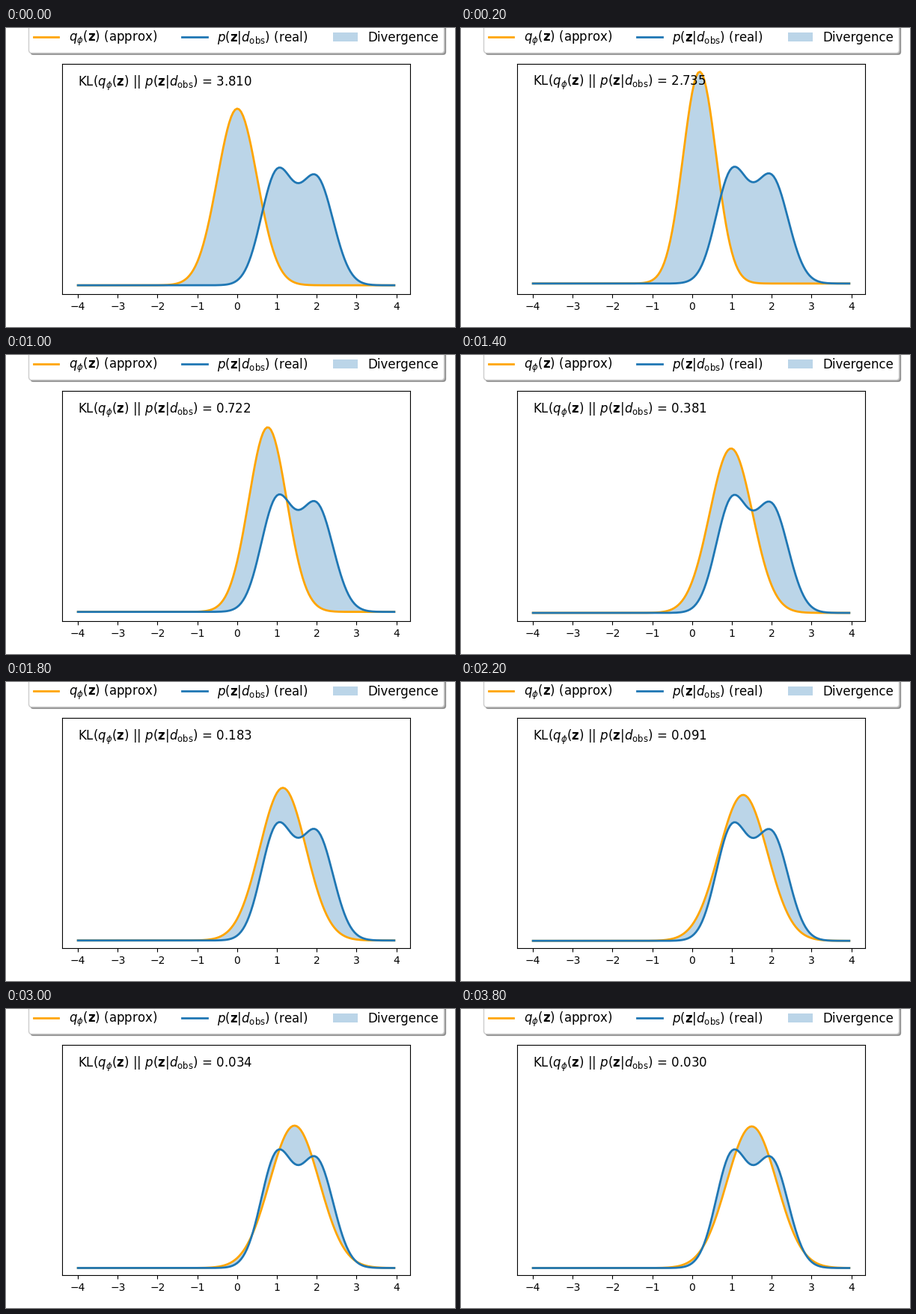
Recreate the animation shown at these times as a matplotlib script. Size 600x400 px, loop 4000 ms.

```python
import numpy as np
import matplotlib.pyplot as plt
from matplotlib.animation import FuncAnimation

FRAMES, INTERVAL = 20, 200

# Optimisation path: step, mean and width of q, divergence
STEPS = np.array([0, 1, 2, 3, 5, 7, 11, 15, 19], float)
MEAN = np.array([0.005, 0.19, 0.36, 0.52, 0.77, 0.98, 1.283, 1.443, 1.499])
WIDTH = np.array([0.5, 0.4137, 0.4149, 0.4285, 0.4775, 0.5385, 0.6094, 0.6251, 0.6284])
KL = np.array([3.810, 2.735, 1.945, 1.376, 0.722, 0.381, 0.091, 0.034, 0.030])


def smooth(t, ys):
    """Cubic Hermite curve through (STEPS, ys)."""
    slopes = np.gradient(ys, STEPS, edge_order=2)
    i = min(np.searchsorted(STEPS, t, side="right") - 1, len(STEPS) - 2)
    h = STEPS[i + 1] - STEPS[i]
    u = (t - STEPS[i]) / h
    return ((1 + 2 * u) * (1 - u) ** 2 * ys[i] + u * (1 - u) ** 2 * h * slopes[i]
            + u * u * (3 - 2 * u) * ys[i + 1] + u * u * (u - 1) * h * slopes[i + 1])


def normal(x, mu, sigma):
    return np.exp(-0.5 * ((x - mu) / sigma) ** 2) / (sigma * np.sqrt(2 * np.pi))


x = np.arange(-4, 4, 0.05)
p = 0.5 * normal(x, 1, 0.4) + 0.5 * normal(x, 2, 0.42)

Q_LABEL = r"$q_\phi(\mathbf{z})$"
P_LABEL = r"$p(\mathbf{z}|d_\mathrm{obs})$"

fig, ax = plt.subplots(figsize=(6, 4), dpi=100)
q_line, = ax.plot(x, p, color="orange", lw=2, label=f"{Q_LABEL} (approx)")
ax.plot(x, p, color="C0", lw=2, label=f"{P_LABEL} (real)")
fill = ax.fill_between(x, p, 0 * p, facecolor="C0", alpha=0.3, label="Divergence")
caption = ax.text(-4, 0.9, "", fontsize=12)
ax.set_xlim(x[0] - 0.05 * np.ptp(x), x[-1] + 0.05 * np.ptp(x))
ax.set_yticks([])
ax.legend(loc="lower center", bbox_to_anchor=(0.5, 1.05), borderaxespad=0,
          ncol=3, fancybox=True, shadow=True, fontsize=12)


def draw(k):
    q = normal(x, smooth(k, MEAN), smooth(k, WIDTH))
    q_line.set_ydata(q)
    fill.set_verts([np.column_stack([np.r_[x, x[::-1]], np.r_[p, q[::-1]]])])
    ax.set_ylim(-0.05 * max(q.max(), p.max()), 1)
    kl = np.exp(smooth(k, np.log(KL)))
    caption.set_text(f"KL({Q_LABEL} || {P_LABEL} = {kl:.3f}")
    return q_line, fill, caption


anim = FuncAnimation(fig, draw, frames=FRAMES, interval=INTERVAL, repeat=True)
plt.show()
```
